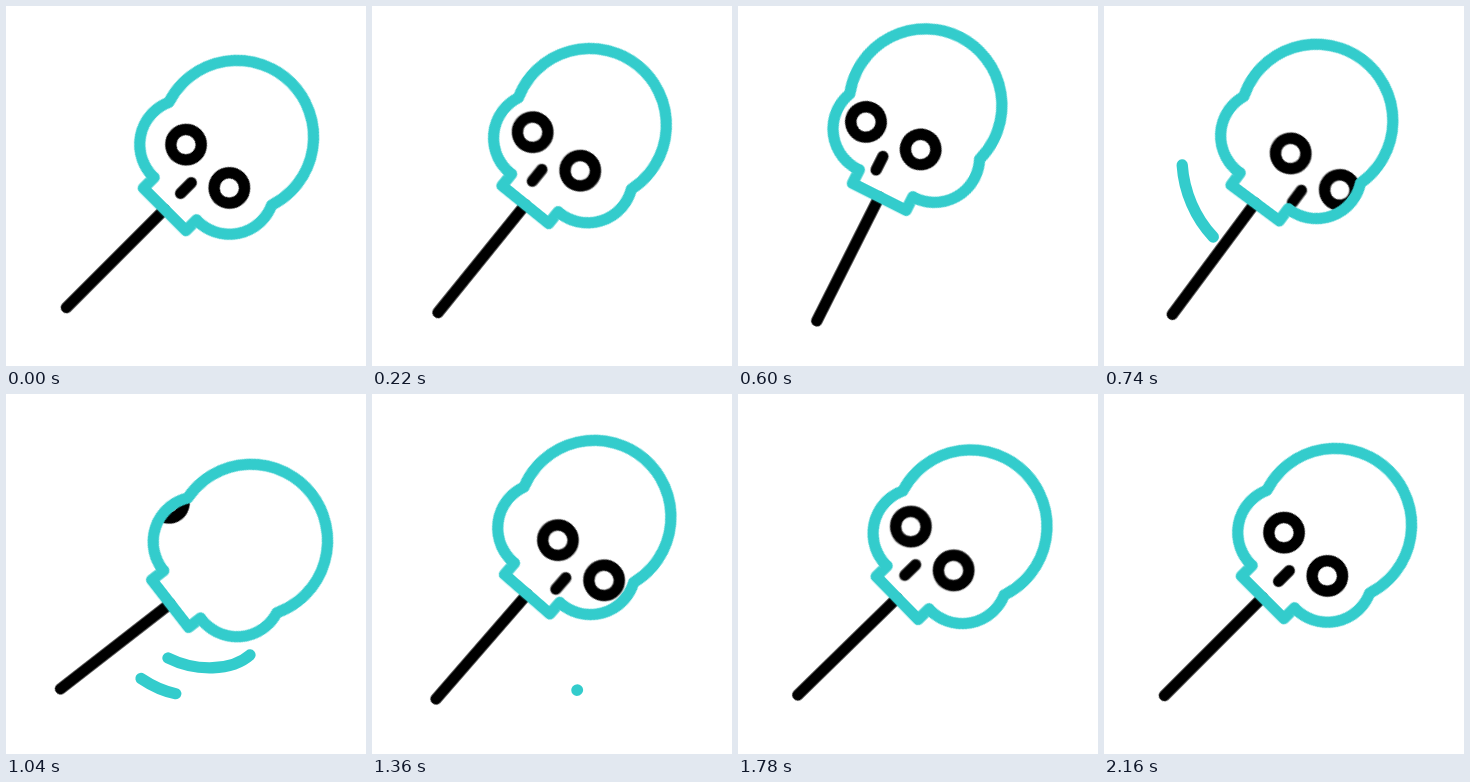
An HTML page for the animation above (2.4 s loop, 360x360 px).

```html
<!DOCTYPE html>
<html lang="en">
<head>
<meta charset="utf-8">
<title>Skull rattle</title>
<style>
  html, body { margin: 0; height: 100%; overflow: hidden; background: #fff; }
  svg {
    display: block; width: 100vw; height: 100vh;
    fill: none; stroke-width: 11.3; stroke-linecap: round; stroke-linejoin: round;
  }
  .dark { stroke: #000; }
  .teal { stroke: #33cccc; }

  .rattle, .face, .trail {
    animation: 2400ms cubic-bezier(.333, 0, .667, 1) infinite;
  }
  .rattle { animation-name: swing; }
  .face { animation-name: spin; }
  .trail { stroke-dasharray: 1 2; stroke-dashoffset: 1.01; }
  .left { animation-name: left; }
  .inner { animation-name: inner; }
  .outer { animation-name: outer; }

  @keyframes swing {
    0% { transform: rotate(45deg); }
    24.17% { transform: rotate(26.5deg); }
    40.21% { transform: rotate(53.3deg); }
    56.88% { transform: rotate(41deg); }
    69.17% { transform: rotate(47deg); }
    77.5%, 100% { transform: rotate(45deg); }
  }
  /* one full turn: the second face, 300 behind, ends where the first began */
  @keyframes spin {
    0% { transform: translate(0, 0); }
    21.46% { transform: translate(-23.6px, 0); }
    59.58% { transform: translate(324px, 0); }
    74.58% { transform: translate(289px, 1.3px); }
    89.58%, 100% { transform: translate(300px, 0); }
  }
  @keyframes left {
    0%, 25.4% { stroke-dashoffset: 1.01; }
    30.8%, 31.6% { stroke-dashoffset: 0; }
    39.2%, 100% { stroke-dashoffset: -1.01; }
  }
  @keyframes inner {
    0%, 36.67% { stroke-dashoffset: 1.01; }
    42.9%, 44.6% { stroke-dashoffset: 0; }
    53.75%, 100% { stroke-dashoffset: -1.01; }
  }
  @keyframes outer {
    0%, 39.7% { stroke-dashoffset: 1.01; }
    46.9%, 47.9% { stroke-dashoffset: 0; }
    57.5%, 100% { stroke-dashoffset: -1.01; }
  }
</style>
</head>
<body>
<svg viewBox="0 0 360 360">
  <defs>
    <path id="head" d="M-30 -67.3V-82.5A45 45 0 0 1 -72.7 -146A76.5 76.5 0 1 1 72.7 -146A45 45 0 0 1 30 -82.5V-67.3Z"/>
    <clipPath id="inside"><use href="#head"/></clipPath>
    <g id="features">
      <circle cx="-30.6" cy="-128.2" r="15.3"/>
      <circle cx="30.6" cy="-128.2" r="15.3"/>
      <path d="M0 -90V-105"/>
    </g>
  </defs>

  <g class="teal">
    <path class="trail left" pathLength="1" d="M109.3 231C91.3 212 80 186 78.2 159"/>
    <path class="trail inner" pathLength="1" d="M162 264C190 278 226 277 244 261"/>
    <path class="trail outer" pathLength="1" d="M135 284.5C158 300 183 306 205.5 296"/>
  </g>

  <!-- drawn upright around the pivot, then tilted -->
  <g transform="translate(111 251)">
    <g class="rattle">
      <path class="dark" d="M0 71.4V-67"/>
      <g clip-path="url(#inside)">
        <g class="face dark">
          <use href="#features"/>
          <use href="#features" x="-300"/>
        </g>
      </g>
      <use class="teal" href="#head"/>
    </g>
  </g>
</svg>
</body>
</html>
```
